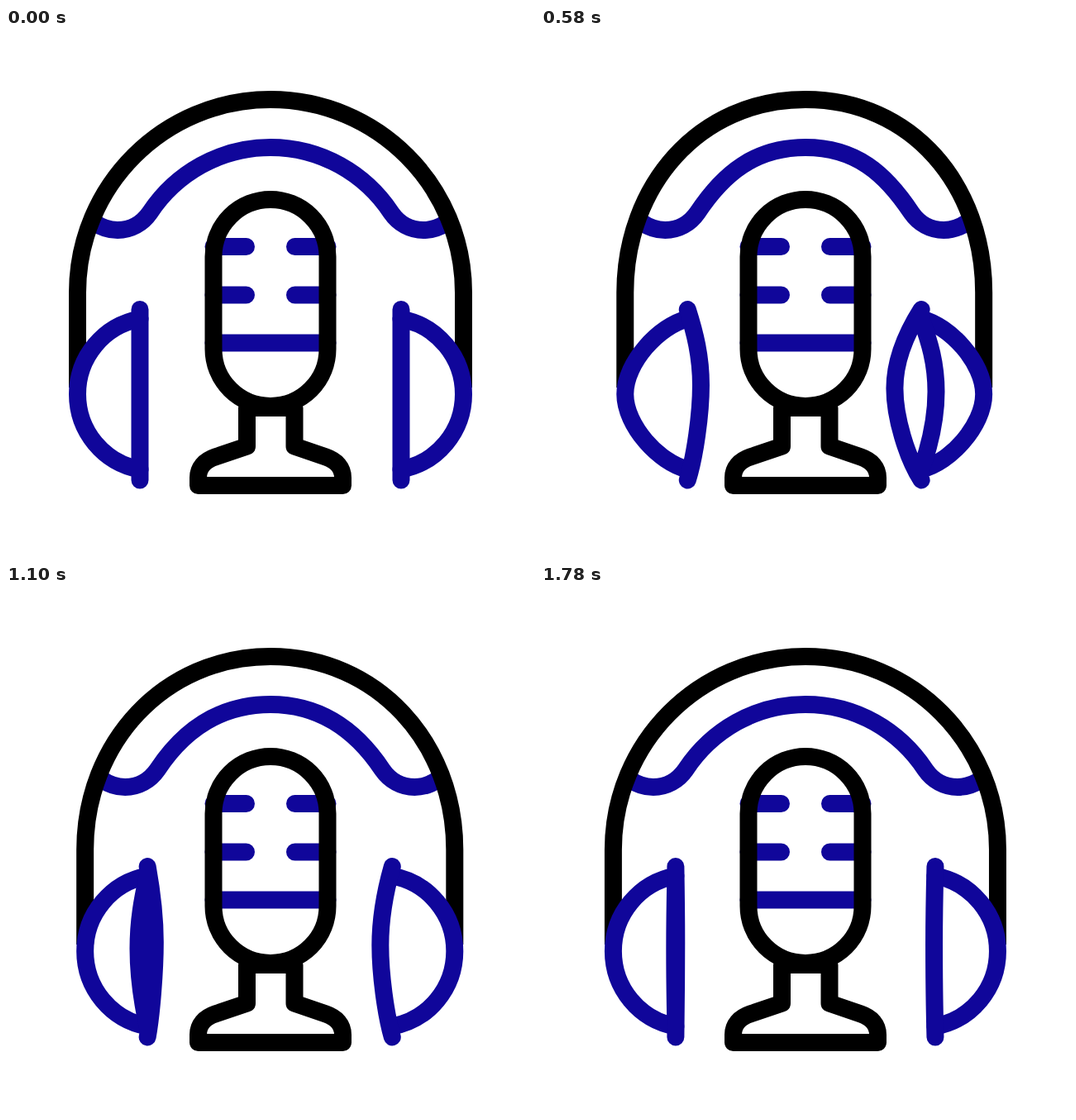
An HTML page that plays this animation: 640 by 640 pixels, repeating every 1.8 s.

```html
<!DOCTYPE html>
<html lang="en">
<head>
<meta charset="utf-8">
<title>Podcast icon</title>
<style>
  html, body { margin: 0; width: 100%; height: 100%; overflow: hidden; background: #fff; }
  svg { display: block; width: 100vw; height: 100vh; }
  path { fill: none; stroke: #000; stroke-width: 21; stroke-linecap: round; stroke-linejoin: round; }
  .blue { stroke: #10069a; }
</style>
</head>
<body>
<svg viewBox="0 0 640 640">
  <path id="wave" class="blue"/>
  <path id="band" style="stroke-linecap:butt"/>
  <path id="cups" class="blue"/>
  <path id="pads" class="blue"/>
  <path class="blue" d="M251 264.5H290.5M389 264.5H349.5M251 323H290.5M389 323H349.5M251 381H389"/>
  <path d="M251 276.5a69 69 0 0 1 138 0v112a69 69 0 0 1-138 0z"/>
  <path d="M291.5 459.5V506L253 519C240 523.5 232.5 532 232.5 544V553.5H407.5V544C407.5 532 400 523.5 387 519L349 506V459.5z"/>
</svg>
<script>
const LOOP = 1800, RAMP = 1100 / 3;
const part = id => document.getElementById(id);
const wave = part('wave'), band = part('band'), cups = part('cups'), pads = part('pads');

const smooth = x => {
  x = Math.min(1, Math.max(0, x));
  return x * x * (3 - 2 * x);
};

// Rises from `start`, holds, and is back at rest at `end`.
const swing = (t, start, end) => smooth(Math.min(t - start, end - t) / RAMP);

// Vertical stroke bowed out to x = apex at mid height.
function bow(x, apex, top, bottom, mid = 440) {
  const c = x + 0.55 * (apex - x);
  return `M${x} ${top}C${c} ${top + 28} ${apex} ${mid - 35} ${apex} ${mid}` +
    `S${c} ${bottom - 28} ${x} ${bottom}`;
}

// Half-round ear cup; side is -1 on the left and 1 on the right.
function cup(x, side, pinch) {
  const c = x + side * (44 - 10 * pinch), edge = x + side * 75.5, k = 44.6 - 7 * pinch;
  return `M${x} 352C${c} 360 ${edge} ${443 - k} ${edge} 443` +
    `S${c} 526 ${x} 534`;
}

function draw(t) {
  const first = t < 900;
  const s = first ? swing(t, 0, 900) : swing(t, 900, 5500 / 3);
  const l = 16 * s, r = -18.7 * s;
  const left = 162 + l, right = 478 + r;

  band.setAttribute('d', `M${86.5 + l} 435V320C${86.5 + l} 191 191 86.5 320 86.5` +
    `S${553.5 + r} 191 ${553.5 + r} 320V435`);

  wave.setAttribute('d', `M${107 + l} 235.5C${115 + l} 241 ${125 + l} 244.5 ${135 + l} 244.5` +
    `C${151 + l} 244.5 ${165 + l} 236.5 ${174 + l} 223.5` +
    `C${205.5 + l} 176 259 144.5 320 144.5` +
    `S${434.5 + r} 176 ${466 + r} 223.5` +
    `C${475 + r} 236.5 ${489 + r} 244.5 ${505 + r} 244.5` +
    `C${515 + r} 244.5 ${525 + r} 241 ${533 + r} 235.5`);

  const pinch = first ? s : 0;
  cups.setAttribute('d', cup(left, -1, pinch) + cup(right, 1, pinch));

  const back = first ? bow(right, 478, 352, 534) : bow(left, 162 - 3.5 * s, 352, 534);
  pads.setAttribute('d', back +
    bow(left, 162 + (first ? 33 : 32) * s, 340.5, 547, 432) +
    bow(right, 478 - (first ? 52.5 : 44) * s, 340.5, 547, 436));
}

const began = performance.now();
function tick() {
  draw((performance.now() - began) % LOOP);
  requestAnimationFrame(tick);
}
draw(0);
requestAnimationFrame(tick);
</script>
</body>
</html>
```
